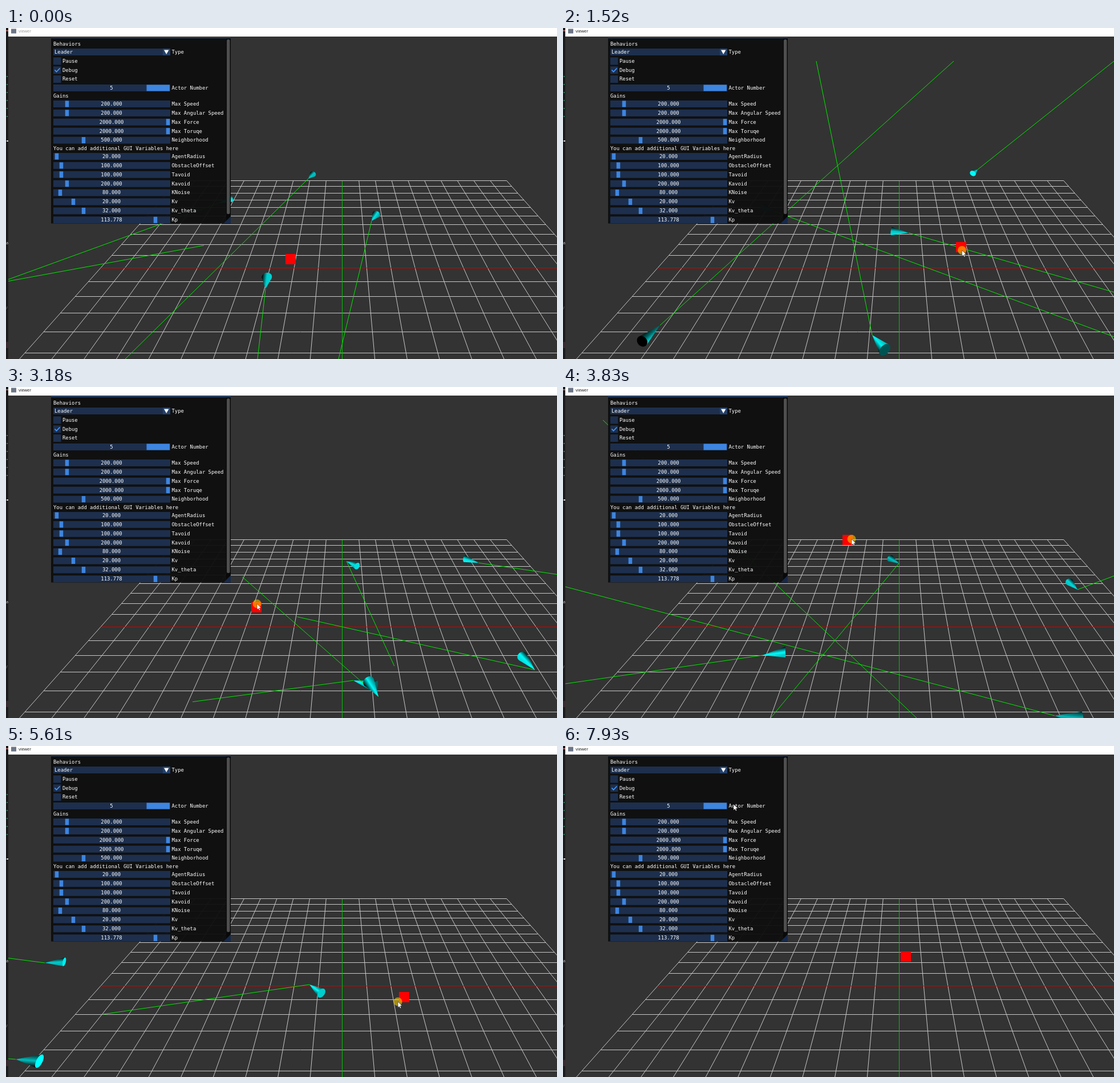
These frames come from a looping animation (966x580 px, 8 s). An HTML page with a canvas:

```html
<!DOCTYPE html>
<html lang="en">
<head>
<meta charset="utf-8">
<title>viewer</title>
<style>
html, body { margin: 0; width: 100%; height: 100%; overflow: hidden; background: #333; }
canvas { display: block; width: 966px; height: 580px; }
</style>
</head>
<body>
<canvas id="stage" width="966" height="580"></canvas>
<script>
const ctx = document.getElementById('stage').getContext('2d');
const LOOP = 8000, STEP = 66.1, LAST_STEP = 120;

// Ground plane: one unit is one grid cell, the origin is where the axes cross.
const HORIZON = -55, CENTER_X = 590, SCALE = 0.0892, DEPTH = 0.0001002, NEAR = 1 / 475.5;
const toWorld = (x, y) => {
  const d = y - HORIZON;
  return [(x - CENTER_X) / (SCALE * d), (1 / d - NEAR) / DEPTH];
};
const toScreen = (x, z, h = 0) => {
  const d = 1 / (z * DEPTH + NEAR);
  return [CENTER_X + x * SCALE * d, d + HORIZON - h * SCALE * d * 0.85];
};

// Tip x/y, guide line end x/y, optional heading in degrees (else along the line).
const SPEED = 0.52, KEY_STEPS = [0, 23, 39, 58, 69, 85, 112];
const flight = (...keys) => keys.map(([x, y, ex, ey, heading], i) => {
  const pos = toWorld(x, y), target = toWorld(ex, ey);
  const angle = heading === undefined
    ? Math.atan2(target[1] - pos[1], target[0] - pos[0])
    : heading * Math.PI / 180;
  return { step: KEY_STEPS[i], pos, end: [ex, ey], dir: [Math.cos(angle), Math.sin(angle)] };
});

const agents = [];
agents.push(flight([530, 264, 209, 580], [170, 521, 685, 58], [579, 309, 966, 407],
  [589, 309, 364, 580, -54], [429, 347, 0, 481], [68, 380, -100, 358, -173]));
agents.push(flight([641, 338, 583, 580, -110], [727, 248, 966, 58], [809, 509, 618, 580, -125],
  [350, 470, 4, 520], [12, 507, -100, 490]));
agents.push(flight([455, 457, 441, 580], [542, 538, 444, 58, 122], [727, 290, 966, 326],
  [902, 355, 966, 331, -82], [896, 406, 593, 455], [532, 418, 170, 470, 129], [-45, 450, -400, 470]));
agents.push(flight([372, 307, 0, 442], [370, 321, 966, 541], [525, 413, 724, 580, -43],
  [640, 599, 70, 58], [296, 556, 250, 580, -152]));
agents.push(flight([-20, 448, 347, 381], [606, 359, 966, 463, -13], [766, 415, 966, 450],
  [862, 576, 4, 350, 171], [515, 537, 386, 580, -165], [17, 549, -100, 540]));

// Step and center of the dragged box; the pointer runs slightly ahead of it.
const PRESS = 8, RELEASE = 112, LEAVE = 114, LEAD = 0.7;
const drag = [
  [PRESS, 498.5, 405], [15, 600, 385], [23, 697.5, 384], [31, 640, 465], [39, 478.5, 467],
  [50, 440, 365], [58, 498.5, 268], [69, 614, 285], [78, 728, 328], [85, 698, 440],
  [92, 525, 476], [98, 455, 445], [105, 510, 376], [RELEASE, 601, 369]
];

const mix = (a, b, u) => a + (b - a) * u;

function segment(keys, stepOf, n) {
  let i = 0;
  while (i < keys.length - 2 && stepOf(keys[i + 1]) <= n) i++;
  const a = stepOf(keys[i]), span = stepOf(keys[i + 1]) - a;
  return { i, span, u: Math.max(0, Math.min(1, (n - a) / span)) };
}

function hermite(a, ta, b, tb, u) {
  const u2 = u * u, u3 = u2 * u;
  return (2 * u3 - 3 * u2 + 1) * a + (u3 - 2 * u2 + u) * ta + (3 * u2 - 2 * u3) * b + (u3 - u2) * tb;
}

function boxAt(n) {
  const { i, span, u } = segment(drag, k => k[0], n);
  const slope = (j, c) => {
    const p = drag[j - 1], q = drag[j + 1];
    return p && q ? (q[c] - p[c]) / (q[0] - p[0]) * span : 0;
  };
  return [1, 2].map(c => hermite(drag[i][c], slope(i, c), drag[i + 1][c], slope(i + 1, c), u));
}

function pointerAt(n) {
  const [x, y] = boxAt(n + LEAD);
  const u = Math.max(0, (n - LEAVE) / (LAST_STEP - LEAVE));
  return [mix(x + 1, 299, u), mix(y + 1, 102, u)];
}

function agentAt(keys, n) {
  const last = keys[keys.length - 1];
  if (n >= last.step) {
    const run = SPEED * (n - last.step);
    const pos = last.pos.map((v, c) => v + last.dir[c] * run);
    const [sx, sy] = toScreen(...last.pos), [x, y] = toScreen(...pos);
    return { pos, dir: last.dir, end: [last.end[0] + x - sx, last.end[1] + y - sy] };
  }
  const { i, span, u } = segment(keys, k => k.step, n);
  const a = keys[i], b = keys[i + 1], pull = SPEED * span;
  const at = v => [0, 1].map(c => hermite(a.pos[c], a.dir[c] * pull, b.pos[c], b.dir[c] * pull, v));
  const p = at(u - 0.001), q = at(u + 0.001);
  const len = Math.hypot(q[0] - p[0], q[1] - p[1]) || 1;
  return {
    pos: at(u),
    dir: [(q[0] - p[0]) / len, (q[1] - p[1]) / len],
    end: [0, 1].map(c => mix(a.end[c], b.end[c], u))
  };
}

function rect(x, y, w, h, color) {
  ctx.fillStyle = color;
  ctx.fillRect(x, y, w, h);
}

function line(a, b, color) {
  ctx.strokeStyle = color;
  ctx.lineWidth = 1;
  ctx.beginPath();
  ctx.moveTo(...a);
  ctx.lineTo(...b);
  ctx.stroke();
}

function polygon(points, fill) {
  ctx.beginPath();
  points.forEach(p => ctx.lineTo(...p));
  ctx.closePath();
  ctx.fillStyle = fill;
  ctx.fill();
}

function text(str, x, y, color = '#fff', align = 'left') {
  ctx.fillStyle = color;
  ctx.textAlign = align;
  ctx.fillText(str, x, y);
}

function drawGrid() {
  const snap = ([x, y]) => [x, Math.floor(y) + 0.5];
  const row = (k, color) => line(snap(toScreen(-10, k)), snap(toScreen(10, k)), color);
  for (let k = -10; k <= 10; k++) {
    if (!k) continue;
    row(k, '#c8c8c8');
    line(toScreen(k, -10), toScreen(k, 10), '#c8c8c8');
  }
  row(0, '#d00000');
  line([589.5, 268], [589.5, 580], '#00c000');
}

const RADIUS = 0.2, LENGTH = 0.83, LIGHT = [3, 6, -5], CAMERA_Z = -21;

function drawAgent({ pos: [x, z], dir: [dx, dz], end }) {
  const tip = toScreen(x, z);
  line(tip, end, '#00e800');
  const bx = x - dx * LENGTH, bz = z - dz * LENGTH;
  const toLight = [LIGHT[0] - bx, LIGHT[1], LIGHT[2] - bz];
  const dist = Math.hypot(...toLight);
  const shade = (nx, ny, nz) => {
    const lit = (nx * toLight[0] + ny * toLight[1] + nz * toLight[2]) / dist;
    const v = Math.round(255 * Math.max(0, Math.min(1, lit * 1.15)));
    return `rgb(0,${v},${v})`;
  };
  const rim = a => toScreen(bx - dz * RADIUS * Math.cos(a), bz + dx * RADIUS * Math.cos(a), RADIUS * Math.sin(a));
  const disc = Array.from({ length: 28 }, (_, i) => rim(i * Math.PI / 14));

  const base = toScreen(bx, bz);
  const ax = tip[0] - base[0], ay = tip[1] - base[1], len = Math.hypot(ax, ay) || 1;
  const r = RADIUS * SCALE * (base[1] - HORIZON);
  const side = (disc[0][0] - base[0]) * -ay + (disc[0][1] - base[1]) * ax < 0 ? -r : r;
  const nx = -ay / len * side, ny = ax / len * side;
  const body = ctx.createLinearGradient(base[0] + nx, base[1] + ny, base[0] - nx, base[1] - ny);
  body.addColorStop(0, shade(-dz, 0.2, dx));
  body.addColorStop(0.5, shade(-0.3 * dx, 0.85, -0.4));
  body.addColorStop(1, shade(dz, 0.2, -dx));

  // The silhouette joins every rim diameter with the tip, all wound the same way.
  ctx.beginPath();
  disc.forEach((p, i) => {
    const q = disc[(i + 14) % 28];
    const turn = (q[0] - p[0]) * (tip[1] - p[1]) - (q[1] - p[1]) * (tip[0] - p[0]);
    const [s, e] = turn < 0 ? [q, p] : [p, q];
    ctx.moveTo(...s);
    ctx.lineTo(...e);
    ctx.lineTo(...tip);
    ctx.closePath();
  });
  ctx.fillStyle = body;
  ctx.fill();
  const facing = dx * bx + dz * (bz - CAMERA_Z) > 0;
  polygon(disc, facing ? shade(-dx, 0, -dz) : body);
}

const FRAME = '#1d2f4d', GRAB = '#3d85e0';
const sliders = [
  ['Max Speed', '200.000', 107], ['Max Angular Speed', '200.000', 107],
  ['Max Force', '2000.000', 284], ['Max Toruqe', '2000.000', 284],
  ['Neighborhood', '500.000', 136], ['AgentRadius', '20.000', 89],
  ['ObstacleOffset', '100.000', 97], ['Tavoid', '100.000', 97],
  ['Kavoid', '200.000', 107], ['KNoise', '80.000', 95],
  ['Kv', '20.000', 118], ['Kv_theta', '32.000', 136], ['Kp', '113.778', 262]
];

function drawSlider(label, value, grabX, y, grabW = 6.5) {
  rect(83, y - 6, 205, 12, FRAME);
  rect(grabX - grabW / 2, y - 5.5, grabW, 11, GRAB);
  text(value, 185, y + 0.5, '#fff', 'center');
  text(label, 290.5, y + 0.5);
}

function drawPanel() {
  ctx.save();
  ctx.beginPath();
  ctx.rect(79, 16, 315, 326.5);
  ctx.clip();
  rect(79, 16, 315, 327, 'rgba(14,14,14,0.95)');
  rect(79, 16, 315, 2, '#24416b');
  rect(386, 18, 8, 324, '#090909');
  ctx.fillStyle = '#4f4f4f';
  ctx.beginPath();
  ctx.roundRect(387, 20, 5.5, 306, 2.5);
  ctx.fill();
  polygon([[394, 330], [394, 343], [381, 343]], '#17294a');

  ctx.font = '8.9px "DejaVu Sans Mono", monospace';
  text('Behaviors', 83, 28.5);
  rect(83, 36, 205, 12, FRAME);
  rect(275, 36, 13, 12, '#24416b');
  polygon([[277, 38.5], [285.5, 38.5], [281.2, 46]], '#fff');
  text('Leader', 85, 42.5);
  text('Type', 290.5, 42.5);
  ['Pause', 'Debug', 'Reset'].forEach((name, i) => {
    const y = 58 + i * 15.8;
    rect(83, y - 6.5, 13.5, 13, FRAME);
    text(name, 99, y + 0.5);
  });
  ctx.strokeStyle = '#4296fa';
  ctx.lineWidth = 1.8;
  ctx.beginPath();
  ctx.moveTo(85.5, 73.5);
  ctx.lineTo(88.5, 76.8);
  ctx.lineTo(94.5, 70.5);
  ctx.stroke();
  drawSlider('Actor Number', '5', 266.7, 105, 40.5);
  text('Gains', 83, 120);
  sliders.forEach((s, i) => drawSlider(...s, 133 + i * 15.9 + (i > 4 ? 12.5 : 0)));
  text('You can add additional GUI Variables here', 83, 211.5);
  ctx.restore();
}

function drawChrome(active) {
  rect(4, 0, 962, 15, '#fff');
  rect(9, 1.5, 9, 8, '#6c7686');
  rect(0, 0, 4, 580, '#1c1c1e');
  rect(0, 4, 4, 1.5, '#c77');
  rect(0, 550, 4, 11, '#3a2a30');
  for (let y = 84; y < 160; y += 14) rect(1, y, 2, 2, '#2f7a55');
  rect(1, 197, 3, 2, '#ddd');
  ctx.font = '7.3px "Open Sans", sans-serif';
  text('viewer', 22, 6.5, active ? '#111' : '#999');
  text('a', 0, 377, '#ccc');
  text('/', 0, 491, '#888');
}

function drawPointer(x, y, pressed) {
  if (pressed) {
    ctx.fillStyle = 'rgba(255,215,0,0.55)';
    ctx.beginPath();
    ctx.arc(x, y, 7.5, 0, Math.PI * 2);
    ctx.fill();
  }
  const arrow = [[0, 0], [0, 10.5], [2.4, 8.3], [4, 11.8], [5.6, 11], [4.1, 7.6], [7.3, 7.4]];
  polygon(arrow.map(([px, py]) => [x + px, y + py]), '#fff');
  ctx.strokeStyle = 'rgba(0,0,0,0.7)';
  ctx.lineWidth = 0.6;
  ctx.stroke();
}

function draw(time) {
  const n = Math.min(LAST_STEP, Math.floor((time % LOOP + 12) / STEP));
  const [boxX, boxY] = boxAt(n);
  ctx.textBaseline = 'middle';
  rect(0, 0, 966, 580, '#333');
  drawGrid();
  agents.map(keys => agentAt(keys, n)).sort((a, b) => b.pos[1] - a.pos[1]).forEach(drawAgent);
  rect(Math.round(boxX - 9), Math.round(boxY - 9), 18, 18, '#f00');
  drawPanel();
  drawChrome(n >= PRESS);
  if (n >= PRESS) drawPointer(...pointerAt(n), n < RELEASE);
}

const start = performance.now();
function tick() {
  draw(performance.now() - start);
  requestAnimationFrame(tick);
}
tick();
</script>
</body>
</html>
```
